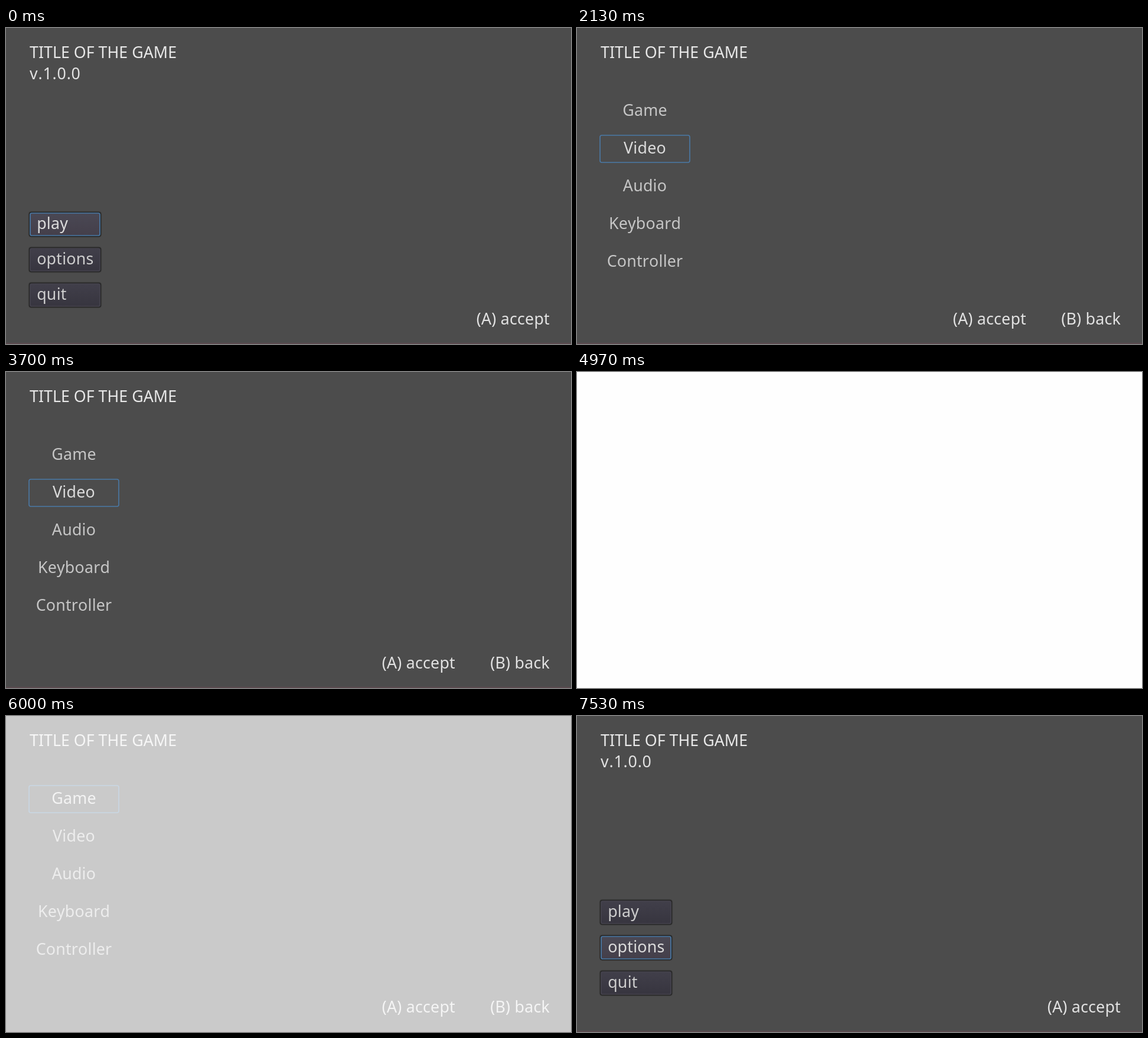
Animation, 957 px wide and 536 px high, one loop 9230 ms. Source, as an HTML page:

```html
<!DOCTYPE html>
<html lang="en">
<head>
<meta charset="utf-8">
<title>Game menu</title>
<style>
  html, body { margin: 0; width: 100%; height: 100%; overflow: hidden; background: #4c4c4c; }
  svg { display: block; width: 100vw; height: 100vh; }
  text {
    font: 26.8px "Noto Sans", "Open Sans", sans-serif;
    font-kerning: none;
    letter-spacing: .2px;
    white-space: pre;
  }
  .title { letter-spacing: 0; }
  .version { letter-spacing: .8px; }
</style>
</head>
<body>
<svg id="stage" viewBox="0 0 957 536" preserveAspectRatio="none">
  <defs>
    <linearGradient id="normal" x2="0" y2="1">
      <stop stop-color="#413f4a"/><stop offset="1" stop-color="#37353f"/>
    </linearGradient>
    <linearGradient id="focused" x2="0" y2="1">
      <stop stop-color="#4a4854"/><stop offset="1" stop-color="#443f4a"/>
    </linearGradient>
    <linearGradient id="pressed" x2="0" y2="1">
      <stop stop-color="#2c2a33"/><stop offset="1" stop-color="#33313b"/>
    </linearGradient>
  </defs>
  <rect width="957" height="536" fill="#4c4c4c"/>
  <rect y="534" width="957" height="2" fill="#5a4a4f"/>
</svg>
<script>
const LOOP = 9230;
const FOCUS = '#4a79a6', DIM = '#c6c6c6', LIT = '#dcdcdc', RED = '#d01818';
const stage = document.getElementById('stage');

function add(parent, tag, attrs, content = '') {
  const el = document.createElementNS('http://www.w3.org/2000/svg', tag);
  for (const key in attrs) el.setAttribute(key, attrs[key]);
  el.textContent = content;
  return parent.appendChild(el);
}

function label(parent, content, x, y, anchor = 'start', color = '#e2e2e2') {
  return add(parent, 'text', { x, y, 'text-anchor': anchor, style: `fill:${color}` }, content);
}

// a rounded box grown by `by` on every side
function box(parent, [x, y, w, h], by, attrs) {
  return add(parent, 'rect', { x: x - by, y: y - by, width: w + 2 * by, height: h + 2 * by, ...attrs });
}

function button(parent, content, x, y, w, h) {
  const g = add(parent, 'g', {});
  const area = [x, y, w, h];
  box(g, area, 2.2, { rx: 5, opacity: .16 });
  box(g, area, 1.2, { rx: 4, opacity: .4 });
  const face = box(g, area, -1, { rx: 2.5, 'stroke-width': 1.7 });
  const caption = label(g, content, x + 12.2, y + 28);
  return state => {
    face.setAttribute('fill', `url(#${state})`);
    face.setAttribute('stroke', state === 'normal' ? '#45434e' : FOCUS);
    caption.style.fill = state === 'normal' ? '#cecece' : LIT;
  };
}

function setting(parent, name, value, left, y, color) {
  label(parent, name, 39.5, y);
  label(parent, '<', left - 1.5, y, 'start', color || '#bcbcbc');
  label(parent, value, 872, y, 'end', color || '#e0e0e0');
  label(parent, '>', 892.5, y, 'start', color || '#bcbcbc');
}

function page(title) {
  const g = add(stage, 'g', {});
  label(g, title, 40, 50.5, 'start', '#e8e8e8').setAttribute('class', 'title');
  return g;
}

function subpage(title) {
  const g = page(title);
  label(g, '(B) back', 831, 497, 'end');
  button(g, 'save', 838, 469, 82, 41)('normal');
  return g;
}

const main = page('TITLE OF THE GAME');
label(main, 'v.1.0.0', 40, 87).setAttribute('class', 'version');
label(main, '(A) accept', 921, 503, 'end');
const mainButtons = ['play', 'options', 'quit'].map((s, i) => button(main, s, 40, 313 + 60 * i, 120, 40));

const options = page('TITLE OF THE GAME');
label(options, '(A) accept', 761, 503, 'end');
label(options, '(B) back', 921, 503, 'end');
const frame = add(options, 'rect', { x: 39, width: 152, height: 46, rx: 3, fill: 'none', stroke: FOCUS, 'stroke-width': 1.6 });
const items = ['Game', 'Video', 'Audio', 'Keyboard', 'Controller']
  .map((s, i) => label(options, s, 115, 149 + 64 * i, 'middle'));

const video = subpage('Video');
setting(video, 'VSYNC', 'yes', 794, 207, RED);
setting(video, 'Display mode', 'windowed', 709, 271);
setting(video, 'Display', '960x540', 727, 335);

const game = subpage('Game');

const pages = { main, options, video, game };
const veil = add(stage, 'rect', { width: 957, height: 536, fill: '#fefefe' });

// [start, value]: the value holds until the next start
const pageTimes = [[0, 'main'], [930, 'options'], [2570, 'video'], [3230, 'options'],
  [4970, 'game'], [5770, 'options'], [7130, 'main']];
const itemTimes = [[0, 1], [1800, 2], [2130, 1], [4500, 0]];
// a partial veil, then full white, then a linear reveal
const fades = [
  { white: 930, from: 1100, to: 1300 },
  { out: 2370, white: 2570, from: 2730, to: 2970 },
  { out: 3200, white: 3230, from: 3500, to: 3700 },
  { white: 4970, from: 5170, to: 5430 },
  { out: 5700, white: 5770, from: 5930, to: 6170 },
  { white: 7130, from: 7370, to: 7530 },
];

const at = (list, t) => list.filter(([start]) => start <= t).pop()[1];

function whiteness(t) {
  for (const { out, white, from, to } of fades) {
    if (out <= t && t < white) return white - out < 100 ? .5 : t < 2470 ? .15 : .55;
    if (t >= white && t < to) return t < from ? 1 : 1 - (t - from) / (to - from);
  }
  return 0;
}

function draw(now) {
  // the picture advances 30 times a second
  const tick = Math.floor((now % LOOP + 4) * .03);
  const t = Math.round(tick / .3) * 10;

  const current = at(pageTimes, t);
  for (const name in pages) pages[name].style.display = name === current ? '' : 'none';

  const chosen = t < 370 ? 0 : 1;
  const held = t >= 730 && t < 930;
  mainButtons.forEach((set, i) => set(i !== chosen ? 'normal' : held ? 'pressed' : 'focused'));

  const item = at(itemTimes, t);
  frame.setAttribute('y', 118 + 64 * item);
  items.forEach((el, i) => el.style.fill = i === item ? LIT : DIM);

  veil.setAttribute('opacity', whiteness(t));
}

const begin = performance.now();
function loop() {
  draw(performance.now() - begin);
  requestAnimationFrame(loop);
}
loop();
</script>
</body>
</html>
```
